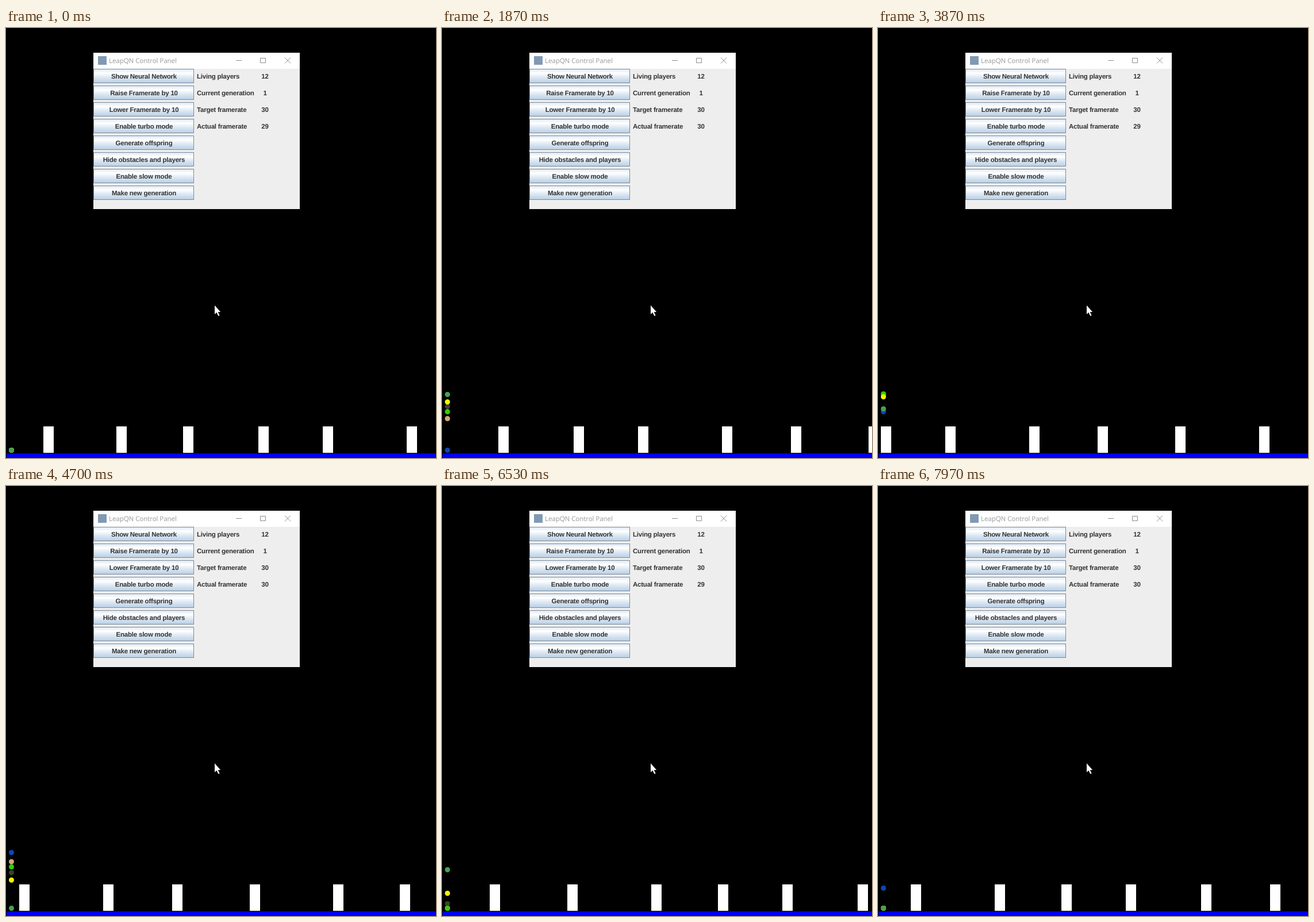
Recreate the animation shown at these times as an HTML page. Size 748x748 px, loop 8 s.

```html
<!DOCTYPE html>
<html lang="en">
<head>
<meta charset="utf-8">
<title>Control Panel</title>
<style>
  html, body { margin: 0; width: 100%; height: 100%; overflow: hidden; background: #000; }
  svg { display: block; width: 100vw; height: 100vh; }
  text { text-rendering: geometricPrecision; }
  .label { font: bold 11.5px "Liberation Sans", Arial, sans-serif; letter-spacing: -0.22px; fill: #333; }
  .title { font: 11.6px "Open Sans", sans-serif; letter-spacing: -0.1px; fill: #999; }
  .mid { text-anchor: middle; }
</style>
</head>
<body>
<svg id="stage" viewBox="0 0 748 748">
  <defs>
    <linearGradient id="metal" x1="0" y1="0" x2="0" y2="1">
      <stop offset="0" stop-color="#dde8f3"/>
      <stop offset="0.3" stop-color="#fff"/>
      <stop offset="0.6" stop-color="#dde8f3"/>
      <stop offset="1" stop-color="#b8cfe5"/>
    </linearGradient>
  </defs>
  <rect width="748" height="748"/>
  <g id="blocks" fill="#fff" shape-rendering="crispEdges"></g>
  <rect x="1" y="740" width="747" height="8" fill="#00f"/>
  <g id="balls"></g>
  <g id="panel">
    <rect x="152" y="43" width="359" height="28" fill="#fff"/>
    <rect x="152" y="71" width="359" height="244" fill="#eee"/>
    <rect x="160" y="49" width="15" height="15" fill="#8199b3"/>
    <text class="title" x="179" y="61">LeapQN Control Panel</text>
    <path d="M400 56.5h10M442.5 52.5h9v8h-9zM485 51.5l10 10M495 51.5l-10 10" fill="none" stroke="#8c8c8c"/>
  </g>
  <path d="M363 482.5V498l3.4-3.2 3 6.2 2.2-1-2.9-6.1h4.5z" fill="#fff"/>
</svg>
<script>
const LOOP = 8000;
const SPEED = 748 / 200;
const START_X = 65.07;
const GROUND = 734.5;

// Spacing between obstacles, in steps of travel
const gaps = [0, 34, 31, 35, 30, 39, 32, 36, 39, 31, 30, 35, 32];
let total = 0;
const arrivals = gaps.map(gap => total += gap);

// Players, back to front; delay = steps from an arrival to the jump
const players = [
  { color: '#0b47b5', delay: 0 },
  { color: '#d2a679', delay: 5 },
  { color: '#3b422b', delay: 7 },
  { color: '#33cc0a', delay: 6 },
  { color: '#f0f800', delay: 8 },
  { color: '#4a9f55', delay: 11 }
];

const buttons = ['Show Neural Network', 'Raise Framerate by 10', 'Lower Framerate by 10',
  'Enable turbo mode', 'Generate offspring', 'Hide obstacles and players',
  'Enable slow mode', 'Make new generation'];
const stats = [['Living players', 12], ['Current generation', 1],
  ['Target framerate', 30], ['Actual framerate', 29]];

const byId = id => document.getElementById(id);

function add(parent, tag, attrs, content) {
  const el = document.createElementNS('http://www.w3.org/2000/svg', tag);
  for (const key in attrs) el.setAttribute(key, attrs[key]);
  if (content !== undefined) el.textContent = content;
  return parent.appendChild(el);
}

const panel = byId('panel');
buttons.forEach((name, i) => {
  add(panel, 'rect', { x: 152.5, y: 71.5 + 29 * i, width: 174, height: 24, fill: 'url(#metal)', stroke: '#7a8a99' });
  add(panel, 'text', { class: 'label mid', x: 240, y: 88 + 29 * i }, name);
});
const values = stats.map(([name, value], i) => {
  add(panel, 'text', { class: 'label', x: 332, y: 88 + 29 * i }, name);
  return add(panel, 'text', { class: 'label mid', x: 450.5, y: 88 + 29 * i }, value);
});

const blocks = arrivals.map(() => add(byId('blocks'), 'rect', { y: 693, width: 18, height: 46 }));
const balls = players.map(p => add(byId('balls'), 'circle', { cx: 9.5, r: 4.5, fill: p.color }));

// Steps last 30, 40 and 30 ms in turn
function stepAt(ms) {
  const rest = ms % 100;
  return 3 * Math.floor(ms / 100) + (rest >= 30) + (rest >= 70);
}

function height(step, delay) {
  let h = 0;
  for (const arrival of arrivals) {
    const n = step - arrival - delay;
    if (n > 0) h = Math.max(h, 19.12 * n - 0.935 * n * n);
  }
  return h;
}

function draw(ms) {
  const step = stepAt(ms);
  blocks.forEach((block, i) => {
    const x = Math.floor(START_X + SPEED * (arrivals[i] - step));
    block.setAttribute('x', x);
    block.setAttribute('visibility', x < 0 ? 'hidden' : 'visible');
  });
  balls.forEach((ball, i) => ball.setAttribute('cy', GROUND - Math.round(height(step, players[i].delay))));
  values[3].textContent = [0, 4, 7, 8].includes(step % 9) ? 29 : 30;
}

const began = performance.now();
function tick() {
  draw((performance.now() - began) % LOOP);
  requestAnimationFrame(tick);
}
draw(0);
requestAnimationFrame(tick);
</script>
</body>
</html>
```
